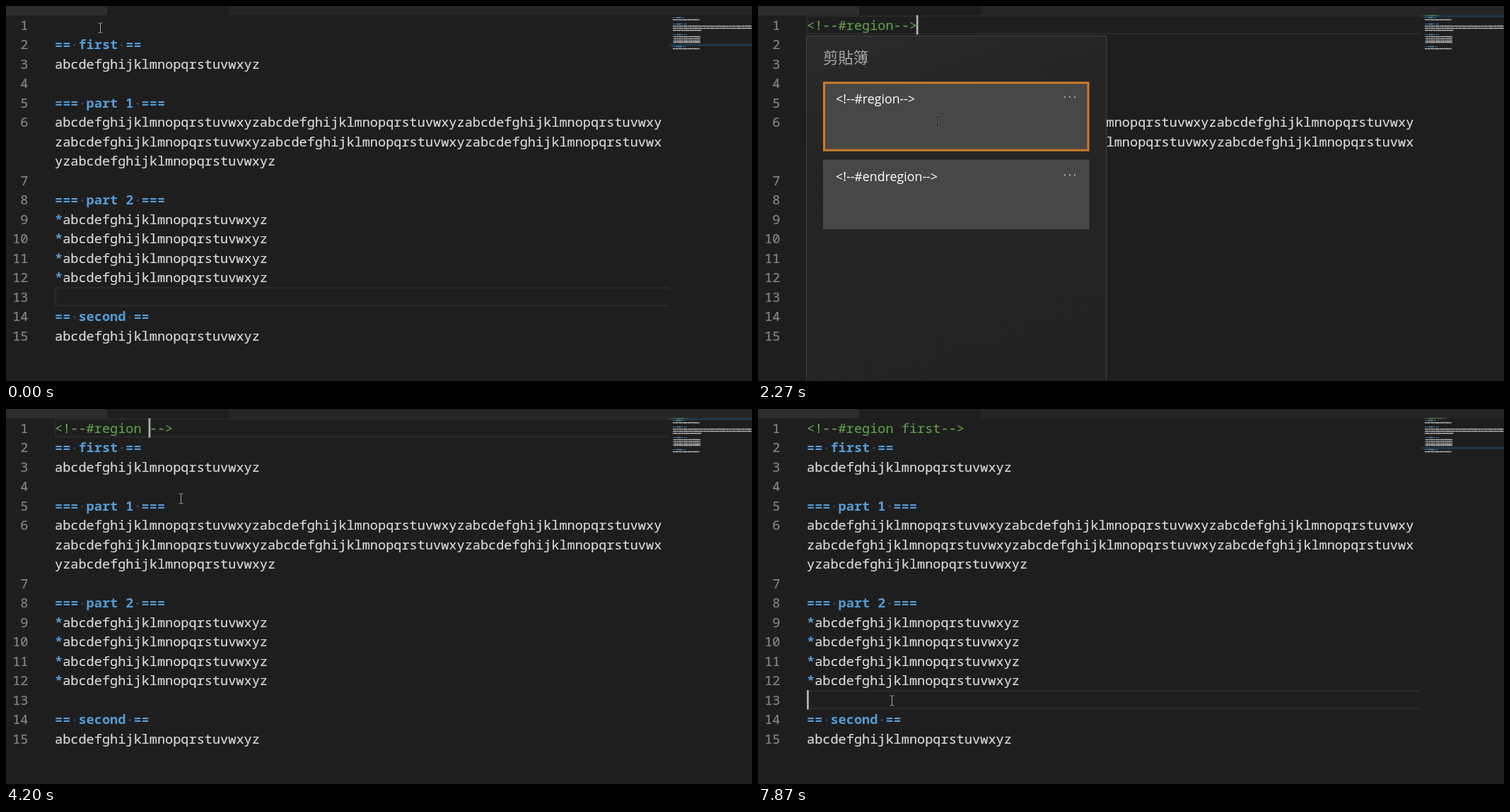
These frames come from a looping animation (1055x531 px, 8 s). An HTML page:

```html
<!DOCTYPE html>
<html lang="en">
<head>
<meta charset="utf-8">
<title>Folding regions</title>
<style>
  html, body { margin: 0; width: 100%; height: 100%; overflow: hidden; background: #1e1e1e; }
  svg { display: block; width: 1055px; height: 531px; }
  text { white-space: pre; font-variant-ligatures: none; fill: var(--ink); }
  .code { --ink: #d8d8d8; font: 18.58px "Noto Sans Mono", "DejaVu Sans Mono", monospace; }
  .code text { stroke: var(--ink); stroke-width: .2; }
  .code .head { --ink: #569cd6; font-weight: 700; stroke: none; }
  .code .note { --ink: #5f9a4c; }
  .code .num { --ink: #858585; text-anchor: end; }
  .code.mini text { stroke: var(--ink); stroke-width: 3; }
  .title { --ink: #a8a8a8; font: 300 21.4px "Noto Sans CJK TC", "Noto Sans CJK", sans-serif; }
  .clip { --ink: #fff; font: 17.8px "Open Sans", "Noto Sans", sans-serif; }
</style>
</head>
<body>
<svg viewBox="0 0 1055 531">
  <defs>
    <linearGradient id="acrylic" x2="0.3" y2="1">
      <stop offset="0" stop-color="#2a2b2c"/>
      <stop offset="0.3" stop-color="#252525"/>
      <stop offset="1" stop-color="#232323"/>
    </linearGradient>
    <path id="beam" d="M-3-7H-1L0-6L1-7H3M0-6V6M-3 7H-1L0 6L1 7H3"/>
  </defs>
  <rect width="1055" height="13" fill="#252526"/>
  <rect width="143" height="13" fill="#2d2d2d"/>
  <rect x="143" width="173" height="13" fill="#1e1e1e"/>
  <path id="line" fill="none" stroke="#282828" stroke-width="2.5" d="M938 1.25H70.25V26.25H938"/>
  <rect id="miniLine" x="938" width="117" height="3" fill="#20394c"/>
  <g id="doc" class="code"></g>
  <g id="mini" class="code mini" transform="translate(934 10.8) scale(.1303 .1065)"></g>
  <rect id="caret" width="2.8" height="27.5" fill="#aeafad"/>
  <g id="panel">
    <g id="panelBody">
      <rect x="68" y="42" width="424.5" height="500" fill="url(#acrylic)"/>
      <text class="title" x="92" y="80.5">剪貼簿</text>
    </g>
    <path d="M68.5 540V42.5H492.5V540" fill="none" stroke="#434343"/>
  </g>
  <g id="mouse" fill="none">
    <use id="rim" href="#beam" stroke-width="3"/>
    <use id="core" href="#beam" stroke-width="1"/>
  </g>
</svg>
<script>
const $ = id => document.getElementById(id);
const LEFT = 69, TOP = 13, CHAR = 11.145, ROW = 27.5, WRAP = 77;
const LOOP = 8000, TICK = 1000 / 15, BLINK = 500;

const abc = "abcdefghijklmnopqrstuvwxyz";
const lines = [
  "", "== first ==", abc, "", "=== part 1 ===", abc.repeat(7), "",
  "=== part 2 ===", ...Array(4).fill("*" + abc), "", "== second ==", abc
];

function add(parent, tag, attrs, content = "") {
  const el = document.createElementNS("http://www.w3.org/2000/svg", tag);
  for (const k in attrs) el.setAttribute(k, attrs[k]);
  el.textContent = content;
  return parent.appendChild(el);
}

// Writes the whole document and returns the element of its first line.
function writeDoc(root) {
  let y = TOP;
  const put = (s, cls = "", x = LEFT) => add(root, "text", { x, y: y + 20.5, class: cls }, s);
  const first = put("", "note");
  lines.forEach((text, i) => {
    if (root.id === "doc") put(i + 1, "num", 31.5);
    if (text[0] === "=") {
      put(text, "head");
      for (const col of [text.indexOf(" "), text.lastIndexOf(" ")])
        add(root, "circle", { cx: LEFT + (col + .5) * CHAR, cy: y + 15, r: 1.5, fill: "#454545" });
    } else if (text[0] === "*") {
      put("*", "head");
      put(text.slice(1), "", LEFT + CHAR);
    } else {
      for (let at = 0; at < text.length; at += WRAP) {
        if (at) y += ROW;
        put(text.slice(at, at + WRAP));
      }
    }
    y += ROW;
  });
  return first;
}

function writeCard(label, y, edge) {
  const body = $("panelBody");
  add(body, "rect", { x: 92, y, width: 376.5, height: 98.5, fill: edge });
  add(body, "rect", { x: 95, y: y + 3, width: 370.5, height: 92.5, fill: "#474747" });
  add(body, "text", { x: 110, y: y + 30.7, class: "clip" }, label);
  for (let i = 0; i < 3; i++)
    add(body, "circle", { cx: 434 + 7 * i, cy: y + 21.8, r: 1.1, fill: "#c4c4c4" });
}

const notes = [$("doc"), $("mini")].map(writeDoc);
writeCard("<!--#region-->", 107.2, "#cd7b27");
writeCard("<!--#endregion-->", 217.5, "#474747");

const CLICK = 160, OPEN = 1390, PASTE = 2260, CLOSE = 2320, CLICK_AGAIN = 7860;
const lefts = [3390, 3520, 3920];
const letters = [4190, 4720, 4990, 5120, 5520, 5720];
const edits = [CLICK, PASTE, ...lefts, ...letters, CLICK_AGAIN];
const count = (times, t) => times.filter(s => s <= t).length;

// Each move bends towards a control point on its way to the end.
const start = [133, 31];
const moves = [
  { from: 1600, to: 1870, via: [290, 200], end: [253, 163] },
  { from: 2500, to: 2730, via: [250, 145], end: [247, 127] },
  { from: 6670, to: 7400, via: [340, 250], end: [190, 402] },
  { from: 7550, to: 7730, via: [190, 408], end: [189, 413] }
];

function mouseAt(t) {
  let pos = start;
  for (const { from, to, via, end } of moves) {
    const u = Math.min(1, Math.max(0, (t - from) / (to - from)));
    const s = u * u * (3 - 2 * u);
    pos = pos.map((p, i) => p * (1 - s) ** 2 + 2 * via[i] * s * (1 - s) + end[i] * s * s);
  }
  return pos;
}

function drawCaret(t, row) {
  const edit = edits.filter(s => s <= t).pop();
  const on = edit !== undefined && Math.floor((t - edit) / BLINK) % 2 === 0;
  const inNote = t >= PASTE && row === 0;
  const col = inNote ? 14 - count(lefts, t) + count(letters, t) : 0;
  $("caret").style.display = on ? "" : "none";
  $("caret").setAttribute("x", Math.max(LEFT, LEFT - 1.2 + col * CHAR));
  $("caret").setAttribute("y", TOP + row * ROW);
}

function drawMouse(t, open) {
  const [x, y] = mouseAt(t).map(Math.round);
  const onCard = open && y > 107;
  $("mouse").setAttribute("transform", `translate(${x + .5} ${y})`);
  $("rim").setAttribute("stroke", onCard ? "#626262" : "#141414");
  $("core").setAttribute("stroke", onCard ? "#111" : "#b4b4b4");
}

function draw(t) {
  const row = t < CLICK || t >= CLICK_AGAIN ? 14 : 0;
  $("line").setAttribute("transform", `translate(0 ${TOP + row * ROW})`);
  $("miniLine").setAttribute("y", 12.8 + row * 2.93);
  drawCaret(t, row);

  const typed = " first".slice(0, count(letters, t));
  for (const el of notes) el.textContent = t < PASTE ? "" : `<!--#region${typed}-->`;

  const open = t >= OPEN && t < CLOSE;
  $("panel").style.display = open ? "" : "none";
  $("panelBody").setAttribute("opacity", Math.min(1, Math.max(0, (t - 1400) / (2 * TICK))));
  drawMouse(t, open);
}

let shown = -1;
function loop() {
  const tick = Math.floor((performance.now() % LOOP) / TICK + .06);
  if (tick !== shown) draw((shown = tick) * TICK % LOOP);
  requestAnimationFrame(loop);
}
loop();
</script>
</body>
</html>
```
